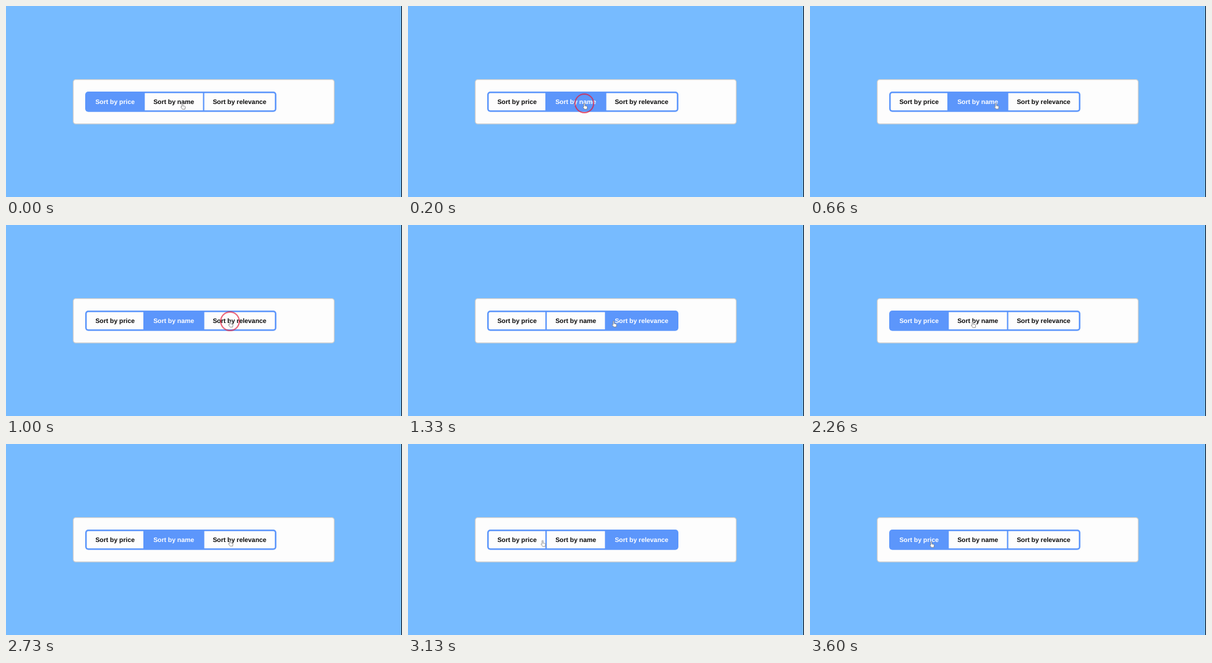
An HTML page that plays this animation: 640 by 308 pixels, repeating every 3.66 s.

```html
<!DOCTYPE html>
<html lang="en">
<head>
<meta charset="utf-8">
<title>Sort buttons</title>
<style>
  :root { --blue: #5c96fb; --paper: #fdfdfd; }
  html, body { margin: 0; width: 100%; height: 100%; overflow: hidden; background: #77bbff; }
  svg { display: block; width: 640px; height: 308px; }

  text {
    font: bold 10.4px "Liberation Sans", Arial, sans-serif;
    text-anchor: middle;
    text-rendering: geometricPrecision;
  }

  .cell, .pointer, .ring {
    animation: 3.66s step-end -.02s infinite;
  }
  .cell rect { fill: currentColor; }
  .price { animation-name: price; }
  .name { animation-name: name; }
  .relevance { animation-name: relevance; }
  .pointer { animation-name: move; }
  .ring { animation-name: press; fill: none; stroke: rgba(225, 30, 60, .75); stroke-width: 1.9; }
  .hand { fill: #fff; stroke: #666; stroke-width: .7; stroke-linejoin: round; }

  /* color paints the cell, fill paints its label */
  @keyframes price {
    0%, 50.81%, 96.44% { color: var(--blue); fill: #fff; }
    5.46%, 65.57% { color: var(--paper); fill: #0a0a0a; }
  }
  @keyframes name {
    0%, 28.96%, 80.05% { color: var(--paper); fill: #0a0a0a; }
    5.46%, 65.57% { color: var(--blue); fill: #fff; }
  }
  @keyframes relevance {
    0%, 50.81%, 96.44% { color: var(--paper); fill: #0a0a0a; }
    28.96%, 80.05% { color: var(--blue); fill: #fff; }
  }

  @keyframes press {
    0%, 7.1%, 30.87%, 52.73%, 67.21%, 81.96%, 98.36% { visibility: hidden; }
    1.63%, 25.4%, 47.26%, 63.66%, 76.5%, 92.89% { visibility: visible; }
  }

  @keyframes move {
    0% { transform: translate(285px, 157px); }
    18.03% { transform: translate(285px, 157px); animation-timing-function: steps(5, start); }
    27.32% { transform: translate(362px, 155.2px); }
    36.33% { transform: translate(362px, 155.2px); animation-timing-function: steps(6, start); }
    47.26% { transform: translate(184px, 154px); }
    61.74% { transform: translate(263px, 156px); }
    71.03% { transform: translate(263px, 156px); animation-timing-function: steps(3, start); }
    76.5% { transform: translate(362px, 155.2px); }
    83.6% { transform: translate(362px, 155.2px); animation-timing-function: steps(2, start); }
    87.43%, 100% { transform: translate(196px, 157.3px); }
    87.42% { transform: translate(217.5px, 155.8px); }
  }
</style>
</head>
<body>
<svg viewBox="0 0 640 308">
  <clipPath id="inner"><rect x="130.5" y="140.4" width="304" height="27.8" rx="2.5"/></clipPath>

  <rect x="639" width="1" height="308" fill="#000"/>
  <rect x="108.7" y="118.7" width="421.8" height="71.4" rx="4" fill="#fdfdfd" stroke="#ccc" stroke-width="1.3"/>
  <rect x="128" y="138" width="309" height="32.7" rx="5" fill="#5c96fb"/>

  <g clip-path="url(#inner)">
    <g class="cell price">
      <rect x="130" y="140" width="92" height="29"/>
      <text x="176.2" y="157.6">Sort by price</text>
    </g>
    <g class="cell name">
      <rect x="224.3" y="140" width="94" height="29"/>
      <text x="271.1" y="157.6">Sort by name</text>
    </g>
    <g class="cell relevance">
      <rect x="320.5" y="140" width="115" height="29"/>
      <text x="377.5" y="157.6">Sort by relevance</text>
    </g>
  </g>

  <g class="pointer">
    <path class="hand" d="M-.9 .6a.9 .9 0 0 1 1.8 0V4l2.7 .5q1.3 .3 1.2 1.6L4.2 9.4H.2L-2.5 5.9q.3-1.2 1.6-.2Z"/>
    <circle class="ring" r="15"/>
  </g>
</svg>
</body>
</html>
```
